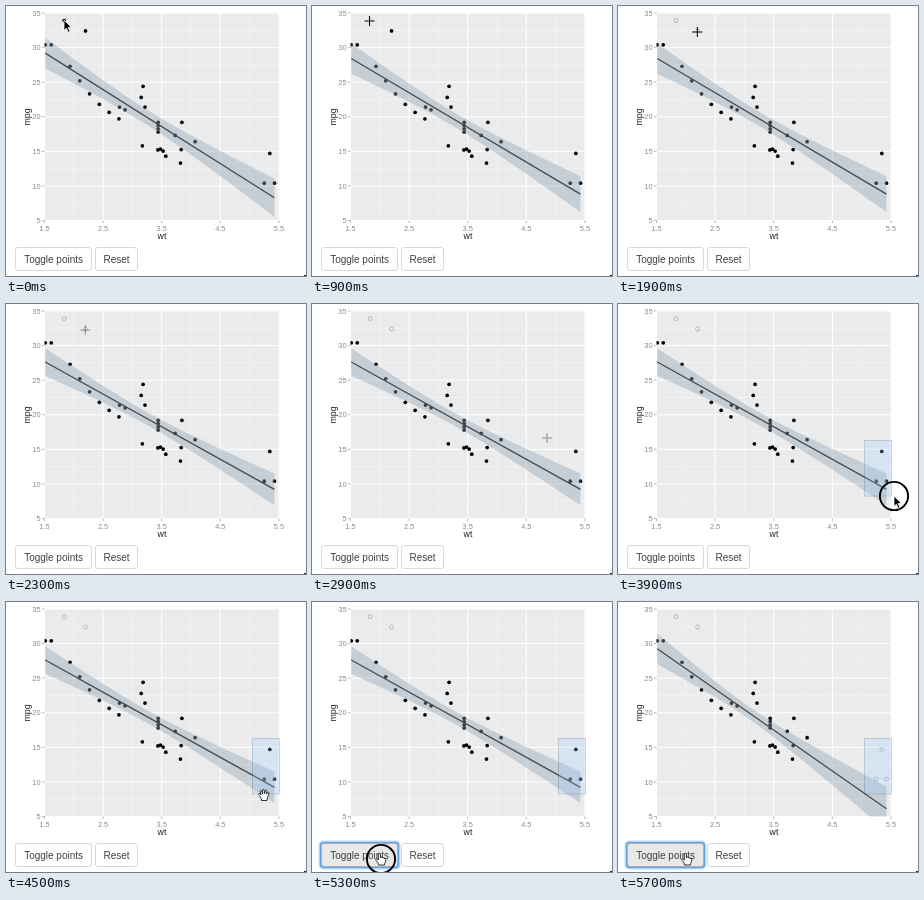
Recreate the animation shown at these times as an HTML page. Size 300 px wide and 270 px high, loop 6.8 s.

```html
<!DOCTYPE html>
<html lang="en">
<head>
<meta charset="utf-8">
<title>Toggle points on a regression plot</title>
<style>
  html, body { margin: 0; width: 100%; height: 100%; overflow: hidden; background: #fff; }
  svg { display: block; width: 300px; height: 270px; }
  text { font-family: "Liberation Sans", Arial, sans-serif; }
  .tick { font-size: 7.4px; fill: #8a8a8a; }
  .title { font-size: 8.8px; fill: #222; text-anchor: middle; }
  .label { font-size: 10px; fill: #404040; text-anchor: middle; }
  .btn { fill: #fff; stroke: #d0d0d0; stroke-width: .8; }
  .btn.hover { fill: #e8e8e8; stroke: #adadad; }
</style>
</head>
<body>
<svg viewBox="0 0 300 270">
  <defs>
    <clipPath id="panel"><rect x="38.5" y="7" width="235" height="207.5"/></clipPath>
  </defs>
  <rect x="38.5" y="7" width="235" height="207.5" fill="#ebebeb"/>
  <g id="axes"></g>
  <g id="plots" clip-path="url(#panel)"></g>
  <text class="title" x="156" y="233">wt</text>
  <text class="title" transform="translate(23.5 111) rotate(-90)">mpg</text>
  <rect id="brush" x="246.4" y="136.4" fill="#9cf" stroke="#036" stroke-width=".7" opacity=".25"/>

  <g id="focus" fill="none" stroke="#4a98e2">
    <rect x="8.3" y="240.3" width="78.4" height="25.4" rx="3" stroke-width="3.4" opacity=".4"/>
    <rect x="8.9" y="240.9" width="77.2" height="24.2" rx="2.5" stroke-width="1.8" opacity=".8"/>
  </g>
  <rect id="toggle" class="btn" x="9.5" y="241.5" width="76" height="23" rx="2.5"/>
  <text class="label" x="47.6" y="256.5">Toggle points</text>
  <rect class="btn" x="89.5" y="241.5" width="42" height="23" rx="2.5"/>
  <text class="label" x="110.5" y="256.5">Reset</text>
  <rect x="298" y="269" width="2" height="1" fill="#222"/>

  <g id="pointer">
    <circle id="ring" r="14.1" fill="none" stroke="#000" stroke-width="1.9"/>
    <g id="cross">
      <circle r="2.4" fill="#ebebeb"/>
      <path d="M-5 0H5M0-5V5" stroke="#000"/>
    </g>
    <path id="arrow" d="M0 0V10.4L2.4 8.2 4.2 12.3 6 11.5 4.2 7.5H7.5Z" fill="#000" stroke="#fff" stroke-width=".8"/>
    <path id="grab" fill="#fff" stroke="#000" stroke-width=".8" stroke-linejoin="round"
      d="M-2.6 5.5C-3-.1-6.5.6-5.2-1.2-4.4-2-3.3-.7-2.8 0L-3.9-3.4C-4-4.9-2.6-4.9-2.2-3.6L-1.4-1.2-1.5-4.6C-1.4-5.9.1-5.9.2-4.6L.5-1.3 1.3-4.2C1.8-5.4 3.1-5 2.9-3.7L2.4-.8 3.7-2.5C4.6-3.2 5.4-2.3 4.9-1.2L3.5 2.6 2.9 5.5Z"/>
    <path id="point" fill="#fff" stroke="#000" stroke-width=".8" stroke-linejoin="round"
      d="M-2.3 6C-2.6 3.4-4.9 2.1-5.3.6-5.1-.7-3.6-.1-2.6 1.1V-4.8C-2.5-6.3-.7-6.3-.6-4.8V-1.5C.2-2.3 1.2-2 1.3-1.1 2.1-1.7 3-1.3 3.1-.5 4-1 4.8-.3 4.8.7 4.8 3 3.5 3.7 3.4 6Z"/>
  </g>
</svg>
<script>
const $ = id => document.getElementById(id);
const LOOP = 6800, STEP = 100;

const X = wt => 38.5 + (wt - 1.5) * 58.6;
const Y = mpg => 214.5 - (mpg - 5) * 6.917;
const at = (wt, mpg) => X(wt).toFixed(2) + ' ' + Y(mpg).toFixed(2);

// Points that get switched off, in order
const toggled = [[1.835, 33.9], [2.2, 32.4], [5.25, 10.4], [5.424, 10.4], [5.345, 14.7]];

// n points evenly spaced between two ends, bowed up or down in the middle
const run = (n, x0, y0, x1, y1, bow = 0) => Array.from({ length: n }, (_, i) => {
  const k = i / (n - 1);
  return [x0 + (x1 - x0) * k, y0 + (y1 - y0) * k + bow * Math.sin(Math.PI * k)];
});
const steady = [
  [3.17, 15.8],
  ...run(2, 1.513, 30.4, 1.615, 30.4),
  ...run(6, 1.935, 27.3, 2.77, 19.7, -1),
  ...run(2, 2.78, 21.4, 2.875, 21),
  ...run(3, 3.15, 22.8, 3.215, 21.4, 2.3),
  ...run(4, 3.44, 19.2, 3.44, 17.8),
  ...run(4, 3.435, 15.2, 3.57, 14.3, .5),
  ...run(2, 3.73, 17.3, 4.07, 16.4),
  ...run(3, 3.845, 19.2, 3.82, 13.3, -1)
];

// Summary of all points, then the same with one point taken away
const all = { n: 32, mx: 3.21725, my: 20.0906, sxx: 29.6787, sxy: -158.617, syy: 1126.047 };
function without(s, [x, y]) {
  const dx = x - s.mx, dy = y - s.my, n = s.n - 1, w = s.n / n;
  return {
    n, mx: s.mx - dx / n, my: s.my - dy / n,
    sxx: s.sxx - w * dx * dx, sxy: s.sxy - w * dx * dy, syy: s.syy - w * dy * dy
  };
}

// Least squares line with the half width of its 95% band
function fit({ n, mx, my, sxx, sxy, syy }) {
  const slope = sxy / sxx, df = n - 2;
  const sd = Math.sqrt((syy - slope * sxy) / df), q = 1.96 + 2.45 / df;
  return {
    line: x => my + slope * (x - mx),
    half: x => q * sd * Math.sqrt(1 / n + (x - mx) ** 2 / sxx)
  };
}

const dots = (list, attrs) => list.map(([w, m]) =>
  `<circle cx="${X(w)}" cy="${Y(m)}" ${attrs}/>`).join('');

function plot(excluded) {
  const off = toggled.slice(0, excluded), on = toggled.slice(excluded);
  const { line, half } = fit(off.reduce(without, all));
  const lo = 1.513, hi = 5.424;
  const xs = Array.from({ length: 41 }, (_, i) => lo + (hi - lo) * i / 40);
  const top = xs.map(x => at(x, line(x) + half(x)));
  const bottom = xs.map(x => at(x, line(x) - half(x))).reverse();
  return `<g>${dots([...steady, ...on], 'r="1.85"')}
    <path d="M${top.concat(bottom).join('L')}Z" fill="rgb(142,163,181)" opacity=".4"/>
    <path d="M${at(lo, line(lo))}L${at(hi, line(hi))}" stroke="#484848" stroke-width="1.3"/>
    ${dots(off, 'r="2" fill="none" stroke="#000" stroke-width=".8" opacity=".25"')}</g>`;
}

function axes() {
  let grid = '', marks = '';
  const rule = (d, w) => `<path d="${d}" stroke="#fff" stroke-width="${w}"/>`;
  for (let v = 1.5; v <= 5.5; v++) {
    const x = X(v);
    grid += rule(`M${x} 7V214.5`, 1);
    if (v < 5) grid += rule(`M${X(v + .5)} 7V214.5`, .35);
    marks += `<path d="M${x} 214.5v2.5" stroke="#999" stroke-width=".7"/>
      <text class="tick" text-anchor="middle" x="${x}" y="224.6">${v}</text>`;
  }
  for (let v = 5; v <= 35; v += 5) {
    const y = Y(v);
    grid += rule(`M38.5 ${y}H273.5`, 1);
    if (v < 35) grid += rule(`M38.5 ${Y(v + 2.5)}H273.5`, .35);
    marks += `<path d="M38.5 ${y}h-2.5" stroke="#999" stroke-width=".7"/>
      <text class="tick" text-anchor="end" x="34.6" y="${y + 2.7}">${v}</text>`;
  }
  return grid + marks;
}

const stages = [0, 1, 2, 5];
$('axes').innerHTML = axes();
$('plots').innerHTML = stages.map(plot).join('');

// Eased pointer moves; a shape holds until the next move starts
const moves = [
  { from: 0, to: 1, x: 58, y: 14, shape: 'arrow' },
  { from: 200, to: 300, x: 57.5, y: 15, shape: 'cross' },
  { from: 900, to: 1300, x: 79.3, y: 26, shape: 'cross' },
  { from: 2300, to: 2700, x: 235, y: 134, shape: 'cross', alpha: .4 },
  { from: 2900, to: 3100, x: 246, y: 136, shape: 'cross', alpha: .4 },
  { from: 3300, to: 3800, x: 276, y: 192, shape: 'arrow' },
  { from: 4300, to: 4500, x: 258, y: 193, shape: 'grab' },
  { from: 4600, to: 5000, x: 69, y: 257, shape: 'arrow' }
];
// Mouse down, mouse up, and the stage the plot redraws to
const presses = [
  { down: 500, up: 700, stage: 1 },
  { down: 1700, up: 1900, stage: 2 },
  { down: 3300, up: 4300, stage: 2 },
  { down: 5300, up: 5500, stage: 3 }
];
const [drag, click] = presses.slice(-2);

const ease = k => k * k * (3 - 2 * k);

function pointer(t) {
  let { x, y, shape } = moves[0], alpha = 1;
  for (const m of moves) {
    if (t < m.from) break;
    const k = ease(Math.min(1, (t - m.from) / (m.to - m.from)));
    x += (m.x - x) * k;
    y += (m.y - y) * k;
    ({ shape, alpha = 1 } = m);
  }
  const over = x < 86 && y > 241;
  return { x, y, alpha, over, shape: over ? 'point' : shape };
}
const show = (el, on) => { el.style.display = on ? '' : 'none'; };

function render(t) {
  const p = pointer(t);
  $('pointer').setAttribute('transform', `translate(${p.x} ${p.y})`);
  for (const id of ['arrow', 'cross', 'grab', 'point']) show($(id), id === p.shape);
  $('cross').style.opacity = p.alpha;
  show($('ring'), presses.some(({ down, up }) => t >= down && t < up));

  const last = presses.filter(({ up }) => t >= up + STEP).pop();
  [...$('plots').children].forEach((g, i) => show(g, i === (last ? last.stage : 0)));

  // The brush trails the pointer and stops at the panel edge
  const corner = pointer(Math.min(t, drag.up) - STEP / 2);
  show($('brush'), t > drag.down);
  $('brush').setAttribute('width', Math.max(0, Math.min(corner.x, 273.6) - 246.4));
  $('brush').setAttribute('height', Math.max(0, corner.y - 136.4));

  $('toggle').classList.toggle('hover', p.over);
  show($('focus'), t >= click.down);
}

const start = performance.now();
function tick() {
  const t = (performance.now() - start) % LOOP;
  render(Math.floor(t / STEP) * STEP);
  requestAnimationFrame(tick);
}
render(0);
requestAnimationFrame(tick);
</script>
</body>
</html>
```
